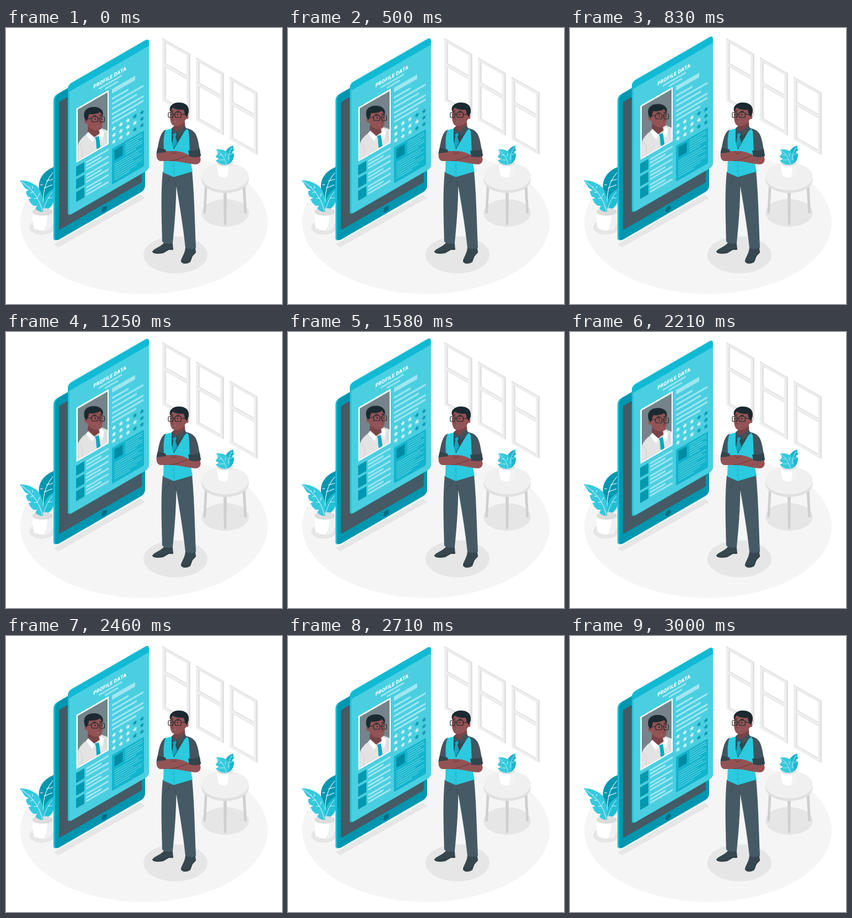
Write an HTML page that moves like this. It is 500 by 500 pixels and loops after 3.04 s.

```html
<!DOCTYPE html>
<html lang="en">
<head>
<meta charset="utf-8">
<title>Profile data</title>
<style>
  html, body { margin: 0; width: 100%; height: 100%; overflow: hidden; background: #fff; }
  svg { display: block; width: 100vw; height: 100vh; }
  .title { font: 800 9.2px Inter, "Open Sans", sans-serif; letter-spacing: .35px; fill: #fff; }
</style>
</head>
<body>
<svg viewBox="0 0 500 500">
  <defs>
    <clipPath id="photoClip"><rect x="18" y="158" width="54" height="92" transform="matrix(1 -.577 0 1 112 0)"/></clipPath>
    <g id="head">
      <path d="M306 170L323 162L325 182L313 190L303 183Z" fill="#7a4447"/>
      <ellipse cx="327.500" cy="160.500" rx="3" ry="4.500" fill="#935354"/>
      <path d="M298 148C296 160 297 172 302 176C308 179 317 177 322 171L327 164L326 146L302 142Z" fill="#935354"/>
      <path d="M297 150C295 141 303 135 313 135C325 135 332 141 331 151C331 156 329 157 327 161L324 156L322 148C314 149 306 147 302 144L298 151Z" fill="#1b2a30"/>
      <path d="M298 151l5-1M309 151l6 .5" stroke="#1b2a30" stroke-width="1.300" fill="none"/>
      <path d="M303 157L300.500 165L304 165.500" stroke="#6b3a3c" fill="none"/>
      <path d="M303 169Q306 171 309 168.500Q307 172.500 303 169" fill="#fff" stroke="#6b3a3c" stroke-width=".5"/>
      <g fill="none" stroke="#1b2a30" stroke-width="1.200">
        <rect x="294" y="153" width="8.500" height="9" rx="2"/>
        <rect x="306" y="153" width="11.500" height="9" rx="2.500"/>
        <path d="M302.500 156h3.500M317.500 156l9 1"/>
      </g>
      <circle cx="299" cy="157" r=".9"/><circle cx="311" cy="157" r=".9"/>
    </g>
  </defs>

  <ellipse cx="250" cy="352" rx="224" ry="130" fill="#f5f5f5"/>
  <g fill="#e6e6e6">
    <ellipse cx="307" cy="411" rx="58" ry="33.500"/>
    <ellipse cx="397" cy="335" rx="43" ry="25"/>
    <ellipse cx="65" cy="361" rx="23" ry="13.500"/>
    <path d="M86 392L95 397L252 308L244 302Z"/>
  </g>
  <g id="windows"></g>

  <!-- table -->
  <path d="M360 286L364.500 288L362 335Q359.500 337 357.500 335ZM428.500 288L433.500 286L436 335Q434 337 431.500 335ZM394 296H400L399 356Q397 358 395 356Z" fill="#cfcfcf"/>
  <path d="M354 269v5a43 25 0 0 0 86 0v-5Z" fill="#e0e0e0"/>
  <ellipse cx="397" cy="269" rx="43" ry="25" fill="#f0f0f0"/>
  <path d="M382 245C382 258 384 265 386 268Q397 274 408 268C410 264 411 255 411 245Z" fill="#fff"/>
  <path d="M403 246h8C411 255 410 264 408 268Q405 271 399 271Q404 262 403 246Z" fill="#f2f2f2"/>
  <ellipse cx="396.500" cy="245" rx="14.500" ry="5.500" fill="#e3e3e3"/>
  <path d="M397 246C396 234 395 225 401 219Q406 214 412 213Q411 217 413 222L409 225L413 228Q413 238 408 243Q403 248 398 247Z" fill="#1fb5cb"/>
  <path d="M381 220Q390 219 396 222Q405 226 406 236Q406 247 397 248Q385 247 380 240L386 237L380 234Q381 230 384 228Q383 223 381 220Z" fill="#35c9de"/>
  <path d="M383 222Q395 230 399 247M410 216Q402 227 403 239M386 230l6 0M398 227l-1 6M386 239l9 0M405 230l6-3" fill="none" stroke="#d9f7fb" stroke-width=".8"/>

  <!-- floor plant -->
  <path d="M86 252C69 259 58 273 60 290C61 304 66 318 67 332L76 318L86 304Z" fill="#0097b0"/>
  <path d="M85 262Q64 286 68 326M62 284l5 0M73 277l12-3M69 290l15-6" fill="none" stroke="#fff" stroke-width="1.100"/>
  <path d="M86 291C73 298 65 312 66 332C76 330 84 323 86 315Z" fill="#22bfd6"/>
  <path d="M84 297Q73 310 68 329M76 308l8 0" fill="none" stroke="#d9f7fb" stroke-width=".9"/>
  <path d="M48 334C48 348 49 358 51 363Q66 371 81 363C84 357 85 346 85 334Z" fill="#fff"/>
  <path d="M75 334h10C85 346 84 357 81 363Q76 367 68 367Q76 354 75 334Z" fill="#f0f0f0"/>
  <ellipse cx="66.500" cy="333" rx="18.500" ry="7" fill="#dcdcdc"/>
  <path d="M25 276Q38 276 47 281Q58 286 62 294Q70 310 67 333Q58 333 53 327L56 322L50 322Q43 317 41 310L46 308L39 305Q36 300 36 296L41 294L34 290Q30 283 25 276Z" fill="#35c9de"/>
  <path d="M28 278Q58 298 66 331M43 287l-3 2M51 297l-7 1M58 308l-7 1M48 291l0-5M58 306l3-7" fill="none" stroke="#e9fbfd"/>

  <!-- tablet -->
  <g transform="matrix(1 -.577 0 1 112 0)">
    <rect x="-26" y="108.500" width="163" height="264" rx="7" fill="#18bdd6"/>
    <rect x="-23" y="109.500" width="163" height="264.500" rx="7" fill="#0096b0"/>
    <rect x="-16" y="125" width="150" height="232" rx="2" fill="#455a64"/>
    <circle cx="66" cy="366" r="5" fill="#006d82"/>
  </g>

  <!-- floating sheet -->
  <g id="sheet">
    <g id="page" transform="matrix(1 -.577 0 1 112 0)">
      <rect y="103" width="147" height="238" rx="6.500" fill="#10bad4"/>
      <path d="M0 117H147V334.500a6.500 6.500 0 0 1-6.500 6.500H6.500a6.500 6.500 0 0 1-6.500-6.500Z" fill="#4acfe1"/>
      <path d="M3 117V334q0 5 4 7h-.5a6.500 6.500 0 0 1-6.500-6.500V117Z" fill="#27c1d8"/>
      <rect x="15.500" y="155" width="58.500" height="98" fill="#fff"/>
      <rect x="18" y="158" width="54" height="92" fill="#75848b"/>
    </g>
    <text class="title" transform="matrix(.866 -.494 0 1 158.500 110)">PROFILE DATA</text>
    <g clip-path="url(#photoClip)">
      <path d="M128 250V220C130 207 137 198 147 192L157 187L174 182L182 185L190 190V230Z" fill="#e3e3e3"/>
      <path d="M133 210L139 222L137 238M179 190L181 206" fill="none" stroke="#cfcfcf"/>
      <use href="#head" transform="translate(472.500 8) scale(-1 1)"/>
      <path d="M149 188L161 199L156 207L145 193ZM168 199L172 184L178 189L174 204Z" fill="#fff"/>
      <path d="M161 198L168 196L169 201L171 215L168 221L164 218L163 203Z" fill="#00a7c0"/>
    </g>
  </g>

  <!-- man -->
  <path d="M286 389L302 390L303 402L295 402L285 408C275 410 266 409 265 405C268 399 280 397 286 389ZM325 398H343L344 407L338 413L334 424C328 428 319 428 317 423C317 416 324 410 325 398Z" fill="#37474f"/>
  <path d="M265 405Q276 409 285 404L303 399M317 421Q326 426 333 420L344 404" fill="none" stroke="#263238" stroke-width=".8"/>
  <path d="M284 260L304 268L337 258C341 300 342 350 344 398C338 401 331 401 325 398C321 360 315 325 308.500 286C308 325 305 360 302 390C296 392 288 391 283 387C282 345 280 300 284 260Z" fill="#455a64"/>
  <path d="M308.500 288L306 278M297 270Q295 280 286 284" fill="none" stroke="#37474f"/>
  <path d="M290 184C281 187 278 200 275 216C271 228 272 240 280 241L292 236ZM324 181C339 183 345 190 348 205L353 231L348 236L328 230Z" fill="#43555e"/>
  <path d="M289 185L301 182L327 181L331 187C333 205 332 225 334 240L338 260L304 270L285 262L286 225C286 210 284 198 289 185Z" fill="#2bcadf"/>
  <path d="M300 182L305 177L325 179L324 186L304 220L300 205Z" fill="#37474f"/>
  <path d="M302 191L307 189L309 193L307 197L310 208L304 218L301 209L303 197Z" fill="#0ea9c1"/>
  <use href="#head"/>
  <path d="M302 180L300 186L303 193L309 188ZM323 177L309 188L313 196L328 183Z" fill="#40525b"/>
  <path d="M304 241L305 269" stroke="#12b2c9" stroke-width=".8"/>
  <g fill="#12a9c0"><circle cx="302" cy="250" r=".9"/><circle cx="302" cy="260" r=".9"/></g>
  <path d="M275 223C271 231 273 240 281 241L302 241C318 242 334 247 345 247C353 246 354 238 351 232L331 230C320 224 309 222 300 223Z" fill="#935354"/>
  <path d="M297 241C307 240 318 236 329 231M299 223L302 228L309 226" fill="none" stroke="#6b3a3c" stroke-width="1.100"/>
  <path d="M275 217L289 220L290 225L273 227ZM330 222C338 223 346 221 351 219L353 232C347 235 340 234 332 233Z" fill="#34444c"/>
</svg>
<script>
const NS = "http://www.w3.org/2000/svg";
const get = id => document.getElementById(id);
const page = get("page");

function add(parent, tag, attrs) {
  const el = document.createElementNS(NS, tag);
  for (const k in attrs) el.setAttribute(k, attrs[k]);
  return parent.appendChild(el);
}
const box = (parent, x, y, width, height, fill) =>
  add(parent, "rect", { x, y, width, height, fill });

for (const [x, y] of [[283, 18], [344, 53], [405, 88]]) {
  const win = add(get("windows"), "g", { transform: `matrix(1 .57 0 1 ${x} ${y})` });
  box(win, 0, 0, 51, 113, "#e0e0e0");
  box(win, 0, 2, 48, 112, "#efefef");
  for (const [top, h] of [[5, 39], [49, 60]]) {
    box(win, 4, top, 40, h, "#e2e2e2");
    box(win, 7, top + 1, 37, h - 3, "#fff");
  }
}

const LIGHT = "#a1e7f0", DARK = "#0599b1";
const lines = [
  [56, 141, 42, 3], [67, 148, 24, 3], [80, 157, 42, 8],
  [80, 173, 30, 3.5], [80, 182, 57, 3.5], [80, 191, 45, 3.5],
  [80, 201, 57, 3.5], [80, 209, 57, 3.5], [80, 217, 44, 3.5]
];
for (const [x, y, w, h] of lines) box(page, x, y, w, h, LIGHT);

// Rating stars, three rows of five
const star = (cx, cy, r) => Array.from({ length: 10 }, (_, i) => {
  const a = i * Math.PI / 5 - Math.PI / 2, d = i % 2 ? r * .42 : r;
  return `${cx + d * Math.cos(a)},${cy + d * Math.sin(a)}`;
}).join(" ");
[3, 4, 3].forEach((full, row) => {
  for (let col = 0; col < 5; col++)
    add(page, "polygon", {
      points: star(83.5 + col * 12.7, 230.3 + row * 11.8, 4.7),
      fill: col < full ? "#d9f5f9" : DARK
    });
});

for (let i = 0; i < 3; i++) {
  const y = 260 + i * 23;
  box(page, 15, y, 15, 18, DARK);
  [41, 28, 41].forEach((w, n) => box(page, 33, y + 1 + n * 6.4, w, 3.3, LIGHT));
}

const NOTE = "#74d7e4";
add(page, "rect", { x: 80, y: 265, width: 58, height: 65, rx: 1.5, fill: "#11b5cd" });
box(page, 84.5, 270, 15, 18, "#008ba3");
[31, 31, 25, 31, 31, 20].forEach((w, i) => box(page, 104, 269 + i * 4, w, 1.2, NOTE));
[50, 44, 50, 34, 50, 50, 40, 28].forEach((w, i) => box(page, 84.5, 295 + i * 4, w, 1.2, NOTE));

const ease = "cubic-bezier(.37, 0, .63, 1)";
get("sheet").animate([
  { transform: "translateY(0px)", easing: ease },
  { transform: "translateY(-9.4px)", easing: ease },
  { transform: "translateY(0px)" }
], { duration: 3040, iterations: Infinity });
</script>
</body>
</html>
```
